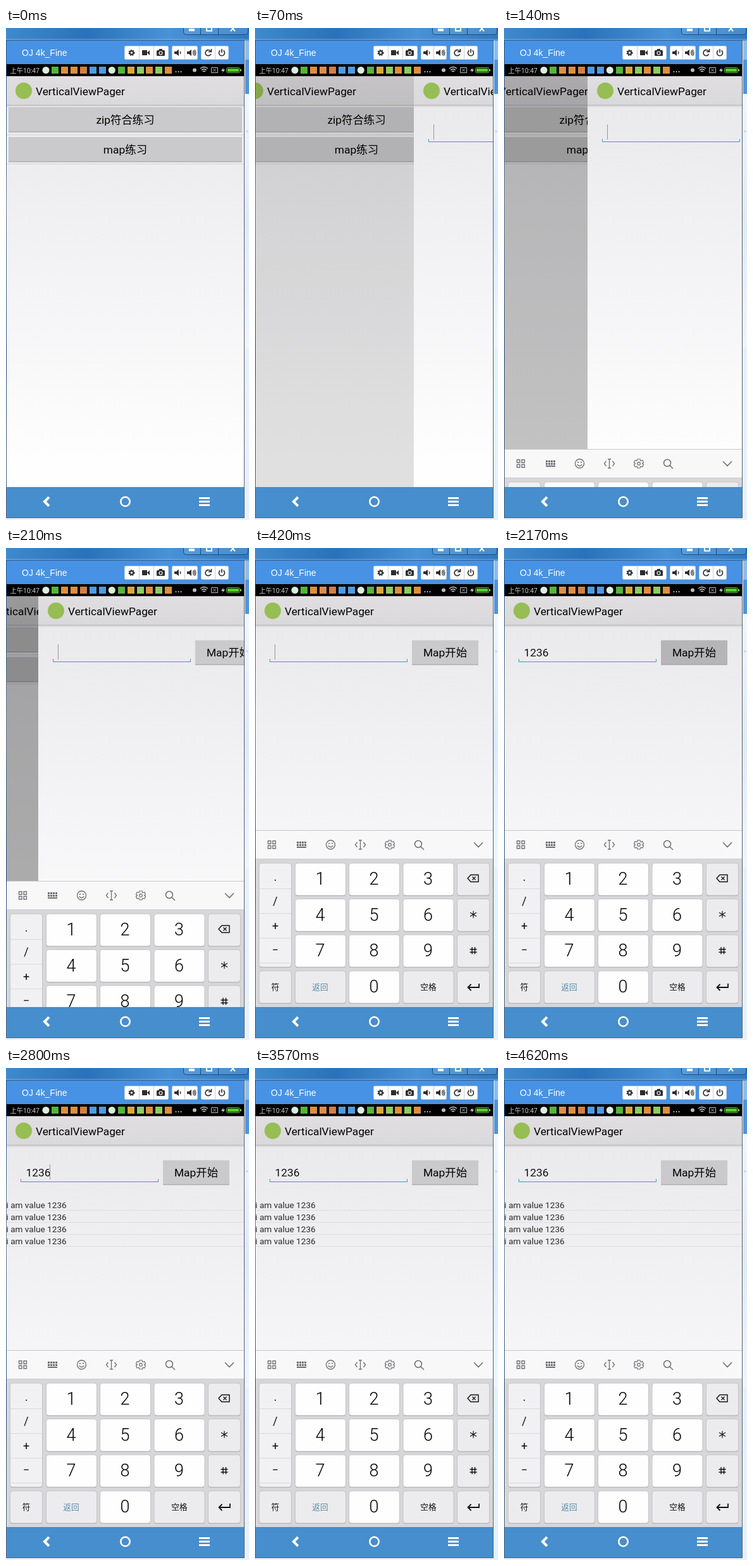
Write an HTML page with a canvas that moves like this. It is 384 px wide and 776 px high and loops after 4690 ms.

```html
<!DOCTYPE html>
<html lang="zh-CN">
<head>
<meta charset="utf-8">
<style>
html, body { margin: 0; width: 100%; height: 100%; overflow: hidden; }
canvas { display: block; }
</style>
</head>
<body>
<canvas id="stage" width="384" height="776"></canvas>
<script>
const c = document.getElementById('stage').getContext('2d');
const LOOP = 4690, STEP = 70, W = 376, TOP = 76, BOTTOM = 724;
const UI_FONT = 'Roboto, "Noto Sans CJK SC", sans-serif';

function rect(x, y, w, h, fill) {
  c.fillStyle = fill;
  c.fillRect(x, y, w, h);
}

function round(x, y, w, h, r, fill, stroke) {
  c.beginPath();
  c.roundRect(x, y, w, h, r);
  if (fill) { c.fillStyle = fill; c.fill(); }
  if (stroke) { c.strokeStyle = stroke; c.lineWidth = 1; c.stroke(); }
}

function disc(x, y, r, fill) {
  c.beginPath();
  c.arc(x, y, r, 0, 7);
  c.fillStyle = fill;
  c.fill();
}

// The size may carry a leading weight, as in '300 27'.
function text(s, x, y, size, color = '#000', align = 'left', family = UI_FONT) {
  c.font = `${size}px ${family}`;
  c.textAlign = align;
  c.fillStyle = color;
  c.fillText(s, x, y);
}

function icon(x, y, d, color, width = 1.5, filled = false) {
  c.save();
  c.translate(x, y);
  c.strokeStyle = c.fillStyle = color;
  c.lineWidth = width;
  const path = new Path2D(d);
  if (filled) c.fill(path);
  if (width) c.stroke(path);
  c.restore();
}

function gradient(x0, y0, x1, y1, ...colors) {
  const g = c.createLinearGradient(x0, y0, x1, y1);
  colors.forEach((color, i) => g.addColorStop(i / (colors.length - 1), color));
  return g;
}

function gear(x, y, r, color, width) {
  c.save();
  c.strokeStyle = color;
  c.lineWidth = width;
  c.beginPath();
  c.arc(x, y, r * 0.62, 0, 7);
  c.stroke();
  c.setLineDash([r * 0.39, r * 0.39]);
  c.beginPath();
  c.arc(x, y, r * 0.93, 0, 7);
  c.stroke();
  c.restore();
}

function desktop() {
  rect(0, 0, 384, 776, '#e6f1fb');
  rect(0, 0, 384, 20, gradient(0, 0, 384, 0, '#3f89cc', '#2a72b9', '#4a92d6', '#2f79c2'));
  rect(0, 17, 384, 3, 'rgba(255,255,255,.18)');
  round(280.5, -6, 102, 16.5, 4, 'rgba(255,255,255,.12)', '#17497c');
  icon(0, 0, 'M307.5 0V10M335.5 0V10', '#17497c', 1);
  rect(289, 1, 9, 4, '#fff');
  icon(0, 0, 'M317 0V4.5H325V0M355 5L362-3M362 5L355-3', '#fff', 2);
  rect(378, 20, 6, 30, '#8dbcec');
  rect(378, 50, 6, 54, '#4f94dc');
  rect(377, 104, 7, 400, gradient(0, 104, 0, 504, '#f1f7fd', '#deebf8', '#f0f6fc'));
  disc(381, 163, 1.8, '#c6d9ec');
  rect(0, 20, 1, 753, gradient(0, 20, 0, 773, '#28548a', '#6b7c90', '#274d78', '#59697a'));
  rect(376, 20, 1, 753, '#56636f');
  rect(0, 19, 377, 1, '#315d8d');
  rect(0, 772, 377, 1, '#4e6274');
}

function header() {
  rect(1, 20, 375, 37, '#4792e4');
  text('OJ 4k_Fine', 25, 44, 14, '#fff', 'left', '"Liberation Sans", sans-serif');
  for (const [x, w, ...cuts] of [[187, 70, 210, 233], [262, 41, 282], [308, 44, 330]]) {
    round(x + .5, 28.5, w - 1, 21, 2, '#fff', '#c5d3e4');
    cuts.forEach(cut => rect(cut, 29, 1, 21, '#c8ccd2'));
  }
  const ink = '#2d2d2d', speaker = 'M-6-2H-3L1-5V5L-3 2H-6Z';
  gear(198.5, 39, 4.4, ink, 2);
  icon(221, 39, 'M-6-4H2V4H-6ZM2 0L6-4V4Z', ink, 0, true);
  round(238, 35, 13, 9, 1.5, ink);
  rect(242, 33, 5, 3, ink);
  icon(244.5, 39.5, 'M-2.5 0A2.5 2.5 0 1 0 2.5 0A2.5 2.5 0 1 0-2.5 0', '#fff', 1.2);
  icon(272, 39, speaker, ink, 0, true);
  icon(274, 39, 'M1-2Q3 0 1 2', ink, 1.2);
  icon(292, 39, speaker, ink, 0, true);
  icon(294, 39, 'M1-2Q3 0 1 2M2-4Q6 0 2 4M4-5Q8 0 4 5', ink, 1.1);
  icon(319.5, 39, 'M4-2A4.5 4.5 0 1 0 4.2 2M5-6V-1.5H.5', ink, 1.7);
  icon(341, 39, 'M-2.5-3.5A4.5 4.5 0 1 0 2.5-3.5M0-6V0', ink, 1.6);
}

function statusBar() {
  rect(1, 57, 375, 19, '#000');
  text('上午10:47', 6.5, 71, 10.3, '#ccc');
  const green = '#55b43c', orange = '#dc8f40', blue = '#4f9be0', pale = '#d9eedc';
  [pale, green, orange, orange, '#d08040', blue, blue, pale, green, '#d8a83a',
    '#8fca62', orange, '#8fca62', orange].forEach((color, i) => {
    const x = 63 + i * 14.9;
    if (color === pale) disc(x, 66.5, 5.5, color);
    else rect(Math.round(x - 5.5), 61, 11, 11, color);
  });
  [268.5, 272.5, 276.5].forEach(x => disc(x, 69, 1.1, '#ccc'));
  disc(298, 66.5, 3, '#bbb');
  icon(313, 66, 'M-6-2Q0-7 6-2M-4 0.5Q0-3 4 0.5M-2 3Q0 1 2 3', '#ccc', 1.3);
  icon(329.5, 66.5, 'M-5-4H5V4H-5ZM-2-2L2 2M2-2L-2 2', '#bbb', 1);
  icon(343, 66.5, 'M1-4L-3 1H0L-1 4L3-1H0Z', '#ddd', 0, true);
  round(348.5, 62.5, 21, 8, 2, '#000', '#6fca3e');
  rect(350, 64, 18, 5, '#55cf20');
  rect(370, 65, 2, 3, '#6fca3e');
}

function pageBase() {
  rect(0, TOP, W, BOTTOM - TOP, gradient(0, 122, 0, 680, '#eae9ec', '#f4f3f5', '#fefefe'));
  rect(0, TOP, W, 46, gradient(0, TOP, 0, 122, '#e0dee0', '#d9d8da'));
  rect(0, 121, W, 5, gradient(0, 121, 0, 126, '#b9b8ba', 'rgba(220,220,222,0)'));
  disc(28, 99, 13, '#97bd55');
  text('VerticalViewPager', 47, 106, 17.3);
}

function button(label, x, y, w, h, fill = '#cacacc') {
  round(x, y + 1, w, h, 1, '#9b9b9d');
  round(x, y, w, h, 1, fill);
  text(label, x + w / 2, y + 25.5, 17.4, '#000', 'center');
}

function menuPage() {
  pageBase();
  button('zip符合练习', 4, 125, 369, 38.5);
  button('map练习', 4, 172, 369, 38.5);
  rect(0, 168, W, 1, '#d3d2d4');
  rect(0, 214, W, 1, '#d6d5d7');
}

function typedText(t) {
  const times = [700, 910, 1330, 1680];
  return '1236'.slice(0, times.filter(at => t >= at).length);
}

function cursorVisible(t) {
  return t < 1960 || (t >= 2520 && t < 3010) || (t >= 3640 && t < 4060);
}

function formPage(t) {
  pageBase();
  const value = typedText(t);
  text(value, 31.5, 171, 17.3, '#111');
  if (cursorVisible(t)) {
    c.font = `17.3px ${UI_FONT}`;
    rect(Math.round(30.5 + c.measureText(value).width), 152, 1, 24, '#969698');
  }
  icon(0, 0, 'M23.5 175V179.5H240.5V175', '#3a9cb8', 1);
  const pressed = t >= 2170 && t < 2310;
  button('Map开始', 248, 145.5, 105, 38, pressed ? '#b5b4b7' : '#cacacc');
  if (t < 2310) return;
  for (let i = 0; i < 4; i++) {
    text('i am value 1236', 0.5, 220.5 + i * 19, 13.6, '#2b2b2b');
    rect(0, 224 + i * 19, W, 1, '#dddde0');
  }
}

function key(x, y, w, h, fill) {
  round(x, y + 1, w, h, 4, '#a9a9ac');
  round(x, y, w, h, 4, fill, '#c4c4c7');
}

function keyboard() {
  rect(1, 445, 375, 46, '#f8f8f9');
  rect(1, 445, 375, 1, '#c9c9cd');
  rect(1, 491, 375, 233, '#d7d7da');
  rect(1, 490, 375, 1, '#cdcdd0');

  const gray = '#707074';
  icon(26.5, 468, 'M-6-6H-1.5V-1.5H-6ZM1.5-6H6V-1.5H1.5ZM-6 1.5H-1.5V6H-6ZM1.5 1.5H6V6H1.5Z', gray, 1.3);
  for (let i = 0; i < 8; i++) rect(66 + (i % 4) * 4, 463 + (i >> 2) * 4, 3, 3, gray);
  rect(66, 471, 15, 2, gray);
  icon(119.5, 468, 'M-7 0A7 7 0 1 0 7 0A7 7 0 1 0-7 0M-4 1.5Q0 6 4 1.5', gray, 1.3);
  disc(117, 466, 1.1, gray);
  disc(122, 466, 1.1, gray);
  icon(166.5, 468, 'M-5-4L-8 0L-5 4M5-4L8 0L5 4M-2.5-7H2.5M-2.5 7H2.5M0-7V7', gray, 1.3);
  icon(213, 468, 'M-2-7H2L3-4.5L6-5L7.5-1.5L5.5 0L7.5 1.5L6 5L3 4.5L2 7H-2L-3 4.5L-6 5L-7.5 1.5L-5.5 0L-7.5-1.5L-6-5L-3-4.5ZM-2.3 0A2.3 2.3 0 1 0 2.3 0A2.3 2.3 0 1 0-2.3 0', gray, 1.2);
  icon(258, 467, 'M-5.5 0A5.5 5.5 0 1 0 5.5 0A5.5 5.5 0 1 0-5.5 0M4 4L9 9', gray, 1.5);
  icon(353, 468, 'M-7-3.5L0 3.5L7-3.5', gray, 1.6);

  const white = '#fefefe', side = '#ececee', ink = '#111', digit = '300 27';
  key(6.5, 497, 51, 164, '#f1f1f3');
  ['.', '/', '+', '−'].forEach((s, i) => {
    rect(7, 537 + i * 39, 50, 1, '#dadadd');
    text(s, 32, [525, 563, 602, 640][i], 18, ink, 'center');
  });
  const columns = [63.5, 148.5, 234], rows = [497, 553.5, 610, 667];
  for (let i = 0; i < 9; i++) {
    const x = columns[i % 3], y = rows[Math.floor(i / 3)];
    key(x, y, 80, 51, white);
    text(i + 1, x + 39.5, y + 34, digit, '#000', 'center');
  }
  rows.forEach(y => key(319.5, y, 51, 51, side));
  key(6.5, 667, 51, 51, side);
  key(63.5, 667, 80, 51, side);
  key(148.5, 667, 80, 51, white);
  key(234, 667, 80, 51, side);
  text('符', 32, 696.5, 12.7, ink, 'center');
  text('返回', 103, 696.5, 12.7, '#5f8ca8', 'center');
  text('0', 188, 700.5, digit, '#000', 'center');
  text('空格', 274, 696.5, 12.7, ink, 'center');
  icon(345, 521, 'M-9 0L-4-5.5H8V5.5H-4ZM-1.5-2.5L3.5 2.5M3.5-2.5L-1.5 2.5', ink, 1.4);
  icon(345, 578, 'M0-5.5V5.5M-5-3L5 3M5-3L-5 3', ink, 1.2);
  icon(345, 635, 'M-2-5.5V5.5M2.5-5.5V5.5M-5.5-2H5.5M-5.5 2.5H5.5', ink, 1.4);
  icon(345, 693, 'M9-6V0H-8M-3.5-5L-8.5 0L-3.5 5', ink, 1.8);
}

function navBar() {
  rect(1, BOTTOM, 375, 48, '#468ecd');
  icon(64, 747, 'M4-7L-3 0L4 7', '#fff', 4);
  icon(188.5, 747, 'M-7.2 0A7.2 7.2 0 1 0 7.2 0A7.2 7.2 0 1 0-7.2 0', '#fff', 2.6);
  [740, 745.5, 751].forEach(y => rect(305, y, 17, 3, '#fff'));
}

// Remaining distance (1 to 0) of a decelerating move.
function remaining(t, start, duration) {
  const p = Math.min(1, Math.max(0, (t - start) / duration));
  return (1 - p) ** 2;
}

function screen(t) {
  c.save();
  c.beginPath();
  c.rect(1, TOP, 375, BOTTOM - TOP);
  c.clip();
  const left = remaining(t, 13, 312);
  const progress = 1 - left;
  if (left > 0) {
    c.save();
    c.translate(-Math.round(W * progress * 0.225), 0);
    menuPage();
    c.restore();
    rect(0, TOP, W, BOTTOM - TOP, `rgba(0,0,0,${0.36 * progress})`);
  }
  if (left < 1) {
    c.save();
    c.translate(Math.round(W * left), 0);
    formPage(t);
    c.restore();
  }
  c.translate(0, Math.round(279 * remaining(t, 117, 200)));
  keyboard();
  c.restore();
}

function draw() {
  const t = Math.floor(performance.now() % LOOP / STEP) * STEP;
  desktop();
  header();
  statusBar();
  screen(t);
  navBar();
  requestAnimationFrame(draw);
}
draw();
</script>
</body>
</html>
```
